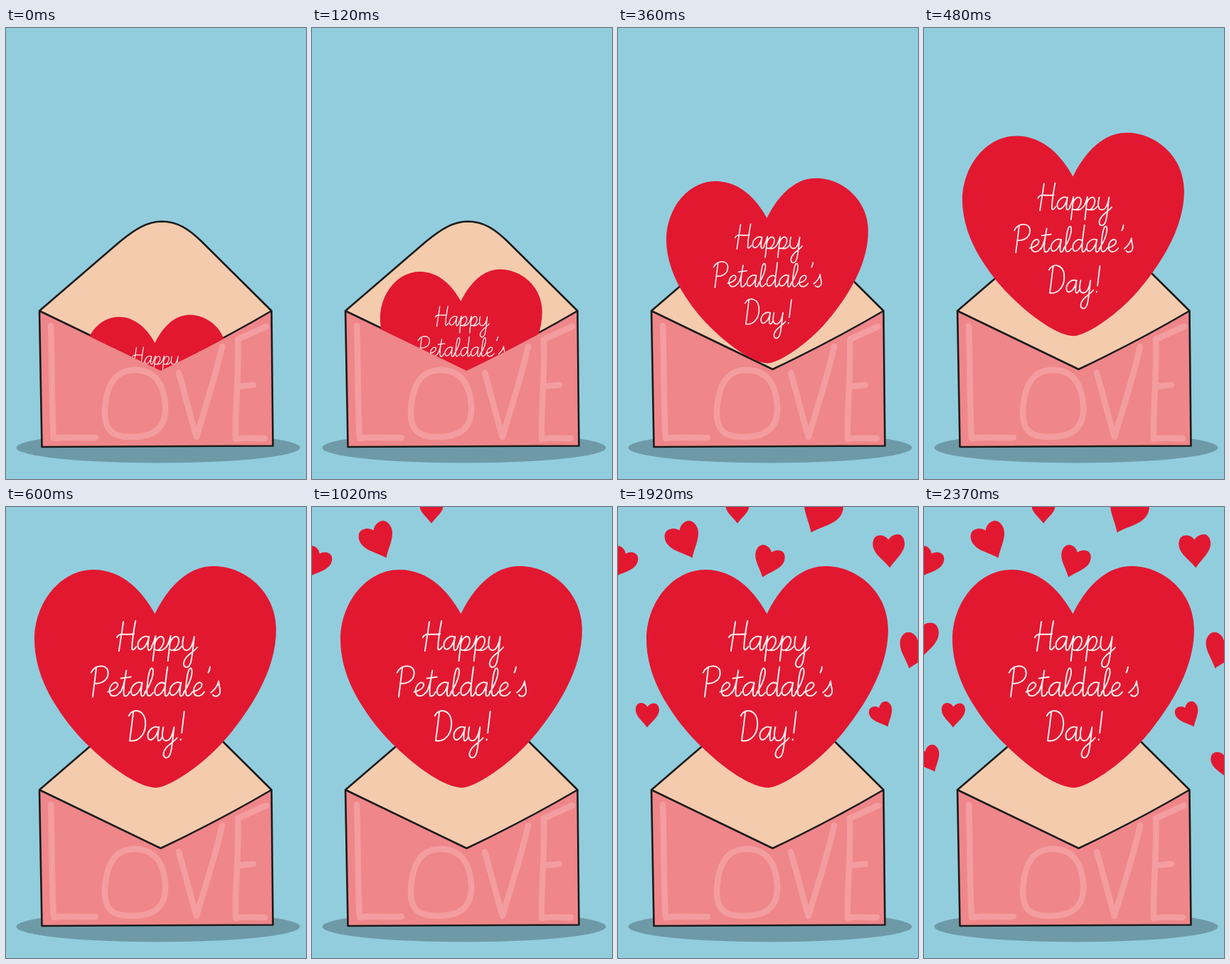
These frames come from a looping animation (422x633 px, 3.12 s). An HTML page:

```html
<!DOCTYPE html>
<html lang="en">
<head>
<meta charset="utf-8">
<title>Love letter</title>
<style>
  html, body { margin: 0; width: 100%; height: 100%; overflow: hidden; background: #92cdde; }
  svg { display: block; width: 100%; height: 100%; }
  path { stroke-linecap: round; stroke-linejoin: round; }
  .ink { fill: none; stroke: #1c1b1b; stroke-width: 2.6; }
  .love { fill: none; stroke: #f39da0; stroke-width: 8.5; }
  .script { fill: none; stroke: #fdeff0; stroke-width: 2; }
  .red { fill: #e21830; }
</style>
</head>
<body>
<svg viewBox="0 0 422 633" role="img" aria-label="Happy Petaldale's Day!">
  <defs>
    <clipPath id="above"><path d="M0 0H422V373L373.5 398.5Q300 442 217.5 481L47 399L0 376Z"/></clipPath>
  </defs>
  <rect width="422" height="633" fill="#92cdde"/>
  <ellipse cx="214" cy="589" rx="199.5" ry="21.5" fill="#6e9aa7"/>
  <path d="M47 397L50.5 588L375.5 586.5L373.5 397Q300 440 217.5 479Z" fill="#ef8689"/>
  <path d="M47 397L160 300C183 281 199 272 219 271.5C240 271.5 256 281 275 299.5L373.5 397Q300 440 217.5 479Z" fill="#f4cbad"/>
  <g class="love">
    <path d="M63 418C65 470 64 530 67 576C86 573 107 576 126 575"/>
    <path d="M181 480C154 480 141 500 139 537C138 563 148 574 176 574C210 574 226 560 224 530C222 498 208 480 181 480Z"/>
    <path d="M243 484C252 514 259 545 268 574C280 533 294 492 304 447"/>
    <path d="M366 419L326 437C328 485 322 530 323 577C337 574 350 576 364 576M327 503L348 501"/>
  </g>
  <path class="ink" d="M47 397L160 300C183 281 199 272 219 271.5C240 271.5 256 281 275 299.5L373.5 397L375.5 586.5L50.5 588L47 397L217.5 479Q300 440 373.5 397"/>
  <g id="small" class="red"></g>
  <g clip-path="url(#above)">
    <g id="card">
      <path class="red" d="M209.5 150C193 120 165 88 123 88C76 88 40 135 40 186C40 218 52 252 73 283C86 303 101 321 118 337C150 368 188 394 212 394C232 392 275 363 305 330C314 320 322 310 330 299C360 258 380 215 380 172C380 118 335 83 292 83C255 83 227 114 209.5 150Z"/>
      <g id="words" class="script"></g>
    </g>
  </g>
</svg>
<script>
  const LOOP = 3120, STEP = 30, RISE = 600, FIRST = 720, GAP = 150;
  const $ = id => document.getElementById(id);

  function addPath(parent, d, transform) {
    const path = document.createElementNS("http://www.w3.org/2000/svg", "path");
    path.setAttribute("d", d);
    path.setAttribute("transform", transform);
    parent.appendChild(path);
    return path;
  }

  // Monoline script: advance width and stroke, baseline at 0
  const script = {
    H: [27, "M8 -40C7 -27 5 -12 4 1M0 -18C3 -26 14 -20 24 -23M25 -41C23 -27 22 -14 22 -4C22 1 25 0 28 -5"],
    P: [24, "M7 -41C6 -25 5 -12 4 1M0 -33C4 -45 24 -46 24 -32C24 -20 12 -17 6 -18"],
    D: [25, "M6 -40C5 -26 4 -10 3 0M0 -35C5 -47 24 -44 24 -22C24 -6 13 2 3 0"],
    a: [20, "M17 -18C10 -23 1 -14 2 -6C3 2 12 0 16 -14L17 -19C16 -10 15 0 18 0C20 0 21 -2 22 -5"],
    d: [20, "M16 -17C9 -23 1 -14 2 -6C3 2 12 0 16 -14L18 -41C16 -20 15 0 18 0C20 0 21 -2 22 -5"],
    e: [16, "M0 -6C8 -8 14 -12 13 -17C11 -22 3 -18 2 -9C2 2 12 2 17 -6"],
    l: [11, "M0 -5C8 -16 13 -34 9 -39C4 -42 3 -18 3 -8C3 2 8 1 12 -5"],
    p: [20, "M0 -5C3 -10 4 -15 5 -20L3 15M4 -8C6 -18 13 -22 16 -17C19 -10 13 0 8 0C5 0 4 -2 4 -3M10 0C16 1 19 -2 21 -5"],
    s: [15, "M0 -5C5 -9 9 -14 10 -21C10 -14 15 -8 12 -3C9 2 4 0 3 -2"],
    t: [12, "M0 -5C4 -12 6 -24 7 -36C5 -20 3 0 7 0C10 0 12 -3 13 -6M0 -25L14 -27"],
    y: [22, "M2 -19C0 -8 1 0 7 0C13 0 16 -10 17 -19C16 -5 16 8 14 17C12 26 4 26 4 18C5 8 16 4 22 -4"],
    "'": [8, "M6 -41C6 -38 5 -35 4 -33"],
    "!": [8, "M7 -41L5 -11M4 -2L4 -1"]
  };

  function write(text, x, y) {
    for (const letter of text) {
      const [width, d] = script[letter];
      addPath($("words"), d, `translate(${x} ${y}) skewX(-3)`);
      x += width + 1.2;
    }
  }
  write("Happy", 155, 201);
  write("Petaldale's", 118, 265.5);
  write("Day!", 171, 328);

  // x, y, angle, scale in order of appearance
  const spots = [
    [93.5, 47.5, -25, 1.08], [5, 78, 25, .9], [168, 5, 0, .74],
    [211, 77, 20, .94], [284.5, 8, 25, 1.25], [381.3, 61, -3, 1],
    [417, 202, 17, 1.05], [372, 292, -25, .74], [41.2, 291.5, 1, .74],
    [424, 361, -10, .86], [7, 354, -25, .79], [-6, 187.5, 3, 1.17]
  ];
  const heart = "M0 -15C-3 -20 -8 -22 -12.5 -22C-19 -22 -22.4 -16 -22.4 -9C-22 4 -8 13 0 24.4C8 13 22 4 22.4 -9C22.4 -16 19 -22 12.5 -22C8 -22 3 -20 0 -15Z";
  const hearts = spots.map(([x, y, angle, size]) =>
    addPath($("small"), heart, `translate(${x} ${y}) rotate(${angle}) scale(${size})`));

  function draw(ms) {
    const t = Math.floor((ms % LOOP) / STEP) * STEP;
    const k = Math.min(t / RISE, 1);
    const size = .588 + .412 * k;
    const y = 442 - 292 * k;
    $("card").setAttribute("transform", `translate(209.5 ${y}) scale(${size}) translate(-209.5 -150)`);
    hearts.forEach((h, i) => h.setAttribute("visibility", t >= FIRST + GAP * i ? "visible" : "hidden"));
  }

  const start = performance.now();
  function tick() {
    draw(performance.now() - start);
    requestAnimationFrame(tick);
  }
  tick();
</script>
</body>
</html>
```
